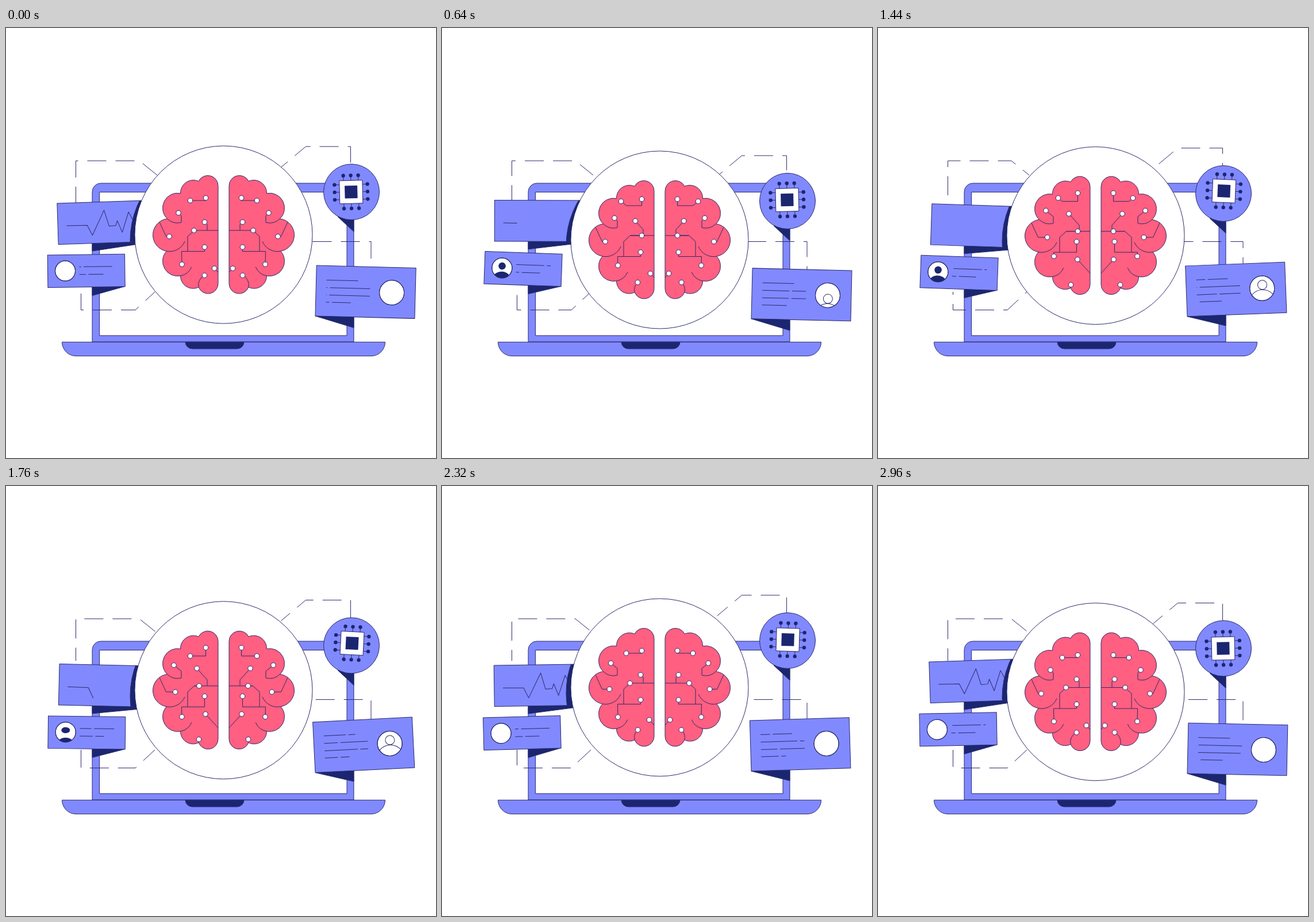
Write an HTML page that moves like this. It is 748 by 748 pixels and loops after 3.04 s.

```html
<!DOCTYPE html>
<html lang="en">
<head>
<meta charset="utf-8">
<title>Brain and laptop</title>
<style>
  html, body { margin: 0; width: 100%; height: 100%; overflow: hidden; background: #fff; }
  svg { display: block; width: 100vw; height: 100vh; }
  .blue { fill: #8189ff; }
  .navy { fill: #1b2670; }
  .white { fill: #fff; }
  .pink { fill: #ff5f80; }
  .line { fill: none; }
  .bare { stroke: none; }
  .march { fill: none; stroke-dasharray: 33 16; }
</style>
</head>
<body>
<svg viewBox="0 0 748 748" stroke="#2a2b6c" stroke-width="1" stroke-linejoin="round">
  <defs>
    <clipPath id="cardClip"><rect id="cardClipRect" x="26.3" y="-75" width="175" height="71.5"/></clipPath>
    <clipPath id="faceClip"><circle cx="-36.5" cy="-28.5" r="17.5"/></clipPath>
    <clipPath id="userClip"><circle cx="132" cy="-44" r="21.5"/></clipPath>
    <linearGradient id="shine" gradientUnits="userSpaceOnUse" x1="-8.5" y1="-8.5" x2="8.5" y2="8.5">
      <stop offset="0" stop-color="#1b2670"/><stop offset="0" stop-color="#fff"/>
      <stop offset="1" stop-color="#fff"/><stop offset="1" stop-color="#1b2670"/>
    </linearGradient>
  </defs>

  <g id="laptop">
    <path class="blue" fill-rule="evenodd" d="M150 546V285A15 15 0 0 1 165 270H590A15 15 0 0 1 605 285V546ZM162.5 285.5V535H593V285.5Z"/>
    <path class="blue" d="M97.5 546.3H659.5A24.3 24.3 0 0 1 635 570.6H122A24.3 24.3 0 0 1 97.5 546.3Z"/>
    <path class="navy" d="M312 546.3H414A12 12 0 0 1 402 558H324A12 12 0 0 1 312 546.3Z"/>
  </g>

  <path id="dashTopLeft" class="march" d="M121.5 304V231H232L263 256"/>
  <path id="dashBottomLeft" class="march" d="M130.5 459V490.5H225L259 459"/>
  <path id="dashRight" class="march" d="M635 421V371.5H533"/>
  <path id="dashChip" class="march" d="M0 -48V-79H-78L-121 -43"/>

  <path id="pulseShadow" class="navy"/>
  <g id="pulseCard">
    <rect class="blue" x="26.3" y="-75" width="175" height="71.5"/>
    <path id="pulse" class="line" pathLength="100" d="M41.5 -35.5L77.5 -35L86 -17.5L107.5 -60.5L115.5 -32.5L127 -33L130 -41.5L138 -21L150 -56L158 -40"/>
  </g>
  <g clip-path="url(#cardClip)"><circle id="brainShadow" class="navy" cx="370.5" r="154.5"/></g>

  <path id="faceShadow" class="navy"/>
  <g id="faceCard">
    <rect class="blue" x="-67" y="-56.5" width="134.3" height="56.5"/>
    <circle class="white" cx="-36.5" cy="-28.5" r="17.5"/>
    <g clip-path="url(#faceClip)" class="navy bare">
      <ellipse id="faceBust" cx="-36.5" rx="16" ry="13.5"/>
      <ellipse id="faceHead" cx="-36.5"/>
    </g>
    <circle class="line" cx="-36.5" cy="-28.5" r="17.5"/>
  </g>

  <path id="userShadow" class="navy"/>
  <g id="userCard">
    <rect class="blue" x="0" y="-88" width="173" height="88"/>
    <circle class="white" cx="132" cy="-44" r="21.5"/>
    <g clip-path="url(#userClip)"><g id="user" class="line">
      <circle cx="132.5" cy="-50" r="8"/>
      <circle cx="132" cy="-17.5" r="24"/>
    </g></g>
    <circle class="line" cx="132" cy="-44" r="21.5"/>
  </g>

  <g id="chip">
    <path class="navy" d="M-24 43L4 69V30Z"/>
    <circle class="blue" r="48.5"/>
    <g id="chipCore"></g>
  </g>

  <g id="brain">
    <circle class="white" r="154.5"/>
    <g id="leftHalf"></g>
    <g id="rightHalf" transform="scale(-1 1)"></g>
  </g>
</svg>
<script>
const LOOP = 3040, STEP = 80;
const el = id => document.getElementById(id);
const set = (node, attrs) => {
  for (const name in attrs) node.setAttribute(name, attrs[name]);
  return node;
};
const add = (parent, tag, attrs) =>
  parent.appendChild(set(document.createElementNS('http://www.w3.org/2000/svg', tag), attrs));

const wave = (t, start = 0) => Math.sin(2 * Math.PI * (t - start) / LOOP);
const clamp = x => Math.min(1, Math.max(0, x));
const ease = x => x < .5 ? 2 * x * x : 1 - 2 * (1 - x) ** 2;
const ramp = (t, a, b) => ease(clamp((t - a) / (b - a)));
const pulseBetween = (t, [a, b, c, d]) => ramp(t, a, b) - ramp(t, c, d);
const place = (id, x, y, deg = 0) =>
  set(el(id), { transform: `translate(${x} ${y}) rotate(${deg})` });
const slope = deg => Math.tan(deg * Math.PI / 180);

// Piecewise linear value through [time, value] points.
function through(t, points) {
  let [t0, v0] = points[0];
  for (const [t1, v1] of points) {
    if (t < t1) return t1 === t0 ? v1 : v0 + (v1 - v0) * (t - t0) / (t1 - t0);
    [t0, v0] = [t1, v1];
  }
  return v0;
}

// Text stroke with small gaps that travel along it once per loop.
const GAP = 4.5;
function textLine(card, x, y, length, travel, gaps) {
  const dashes = gaps.flatMap((gap, i) => [(gaps[i + 1] ?? gaps[0] + travel) - gap - GAP, GAP]);
  const node = add(el(card), 'path', {
    class: 'line', d: `M${x} ${y}h${length}`, 'stroke-dasharray': dashes.join(' ')
  });
  return u => set(node, { 'stroke-dashoffset': -(gaps[0] + GAP / 2 + travel * u) });
}
const textLines = [
  textLine('faceCard', -12, -35.3, 60, 216, [-156.5, -102.5, -48.5, 5.5]),
  textLine('faceCard', -12, -22, 42, 146, [-96, -59.5, -23, 13.5]),
  textLine('userCard', 18, -63, 55, 216, [-146, -84.5]),
  textLine('userCard', 18, -50, 76, 216, [-99, 4]),
  textLine('userCard', 18, -37, 76, 216, [-134, -65, 3.2]),
  textLine('userCard', 18, -24.5, 43, 216, [-132, -100, 8])
];

// Chip with three pins on each side.
const core = el('chipCore');
for (const side of [0, 90, 180, 270]) {
  const [c, s] = [Math.cos(side * Math.PI / 180), Math.sin(side * Math.PI / 180)];
  for (const k of [-13, 0, 13]) {
    const at = r => [r * c - k * s, r * s + k * c];
    const [a, b] = [at(20), at(27)];
    add(core, 'path', { d: `M${a}L${b}` });
    const [cx, cy] = at(28.7);
    add(core, 'circle', { cx, cy, r: 3.2, fill: 'url(#shine)', stroke: 'none' });
  }
}
add(core, 'rect', { x: -20, y: -20, width: 40, height: 40, class: 'white' });
add(core, 'rect', { x: -11, y: -11, width: 22, height: 22, fill: 'url(#shine)', stroke: 'none' });

// Half a brain: overlapping round lobes [x, y, radius], from top to bottom.
const lobes = [
  [-27.5, -85, 18], [-52.5, -72.5, 22.5], [-80, -46.5, 26], [-94.5, .5, 28.5],
  [-80, 46, 26], [-53, 71.5, 22], [-27, 85, 17.5]
];
// Outer crossing of two neighbouring lobes.
function joint([ax, ay, ar], [bx, by, br]) {
  const dx = bx - ax, dy = by - ay, d = Math.hypot(dx, dy);
  const along = (d * d + ar * ar - br * br) / (2 * d);
  const out = Math.sqrt(ar * ar - along * along);
  return [ax + (along * dx - out * dy) / d, ay + (along * dy + out * dx) / d];
}
const joints = lobes.slice(1).map((lobe, i) => joint(lobes[i], lobe));
const arcTo = (r, point) => `A${r} ${r} 0 0 0 ${point}`;
const halfOutline = 'M-9.5 -85' +
  lobes.map(([, , r], i) => arcTo(r, joints[i] ?? [-9.5, 85])).join('') + 'Z';
const folds = [[2, [-73.5, -21.3]], [3, [-67.5, 11.5]], [4, [-55.7, 56]]]
  .map(([i, end]) => `M${joints[i]}${arcTo(lobes[i][2], end)}`).join('');

// Circuit nodes: rest point, far point, times out and back, wire leading to the node.
const circuits = [
  { from: [-31, -64], to: [-31, -74], when: [400, 800, 1850, 2250], wire: 'M-58 -59.5H-31' },
  { from: [-58, -59.5], to: [-67, -67], when: [220, 520, 1340, 1640], wire: 'M-58 -59.5' },
  { from: [-78.5, -38], to: [-86.5, -43.5], when: [1000, 1400, 2200, 2560], wire: 'M-73.5 -21.5V-33' },
  { from: [-33, -22], to: [-46.5, -38], when: [400, 800, 1850, 2250], wire: 'M-28.5 -7.5V-18' },
  { from: [-51.5, -7.5], to: [-31, -7.5], when: [0, 320, 1600, 1900], wire: 'M-9.5 -7.5H-51L-62.5 3V29M-51 -7.5' },
  { from: [-33, 21.5], to: [-33, 10.5], when: [800, 1120, 1850, 2250], wire: 'M-73 29H-33' },
  { from: [-72.5, 51.5], to: [-72.5, 36], when: [450, 850, 1560, 1900], wire: 'M-73 29' },
  { from: [-94.5, 3], to: [-84, 3], when: [850, 1180, 2180, 2540], wire: 'M-111.5 -22L-100 3' },
  { from: [-16, 58.5], to: [-31.5, 41.5], when: [780, 1100, 2060, 2410], wire: 'M-9.5 65.5' },
  { arc: [-27, 85.5, 16], when: [500, 850, 2100, 2460] }
];
const halves = ['leftHalf', 'rightHalf'].map(id => {
  const g = el(id);
  add(g, 'path', { class: 'pink', d: halfOutline });
  add(g, 'path', { class: 'line', d: folds });
  const wires = circuits.map(() => add(g, 'path', { class: 'line' }));
  const nodes = circuits.map(() => add(g, 'circle', { class: 'white', r: 4.2 }));
  return { wires, nodes };
});

function drawCircuits(t) {
  circuits.forEach((circuit, i) => {
    const k = pulseBetween(t, circuit.when);
    let x, y, d;
    if (circuit.arc) {
      const [cx, cy, r] = circuit.arc, angle = (-112.5 - 67.5 * k) * Math.PI / 180;
      x = cx + r * Math.cos(angle);
      y = cy + r * Math.sin(angle);
      d = `M${joints[5]}A18 18 0 0 1 ${x} ${y}`;
    } else {
      [x, y] = circuit.from.map((a, j) => a + (circuit.to[j] - a) * k);
      d = `${circuit.wire}L${x} ${y}`;
    }
    for (const { wires, nodes } of halves) {
      set(wires[i], { d });
      set(nodes[i], { cx: x, cy: y });
    }
  });
}

function drawPulseCard(t, s) {
  const deg = 1.95 * wave(t, 600), y = 380.8 - 6.5 * s;
  const bottom = x => y - 3.5 + (x - 65) * slope(deg);
  place('pulseCard', 65, y, deg);
  place('cardClipRect', 65, y, deg);
  set(el('pulseShadow'), { d: `M150 ${bottom(150) - 9}V${bottom(150) + 13.5}L230 ${bottom(230) + 4}V${bottom(230) - 9}Z` });
  const shown = t < 1200 ? 1 - ramp(t, 100, 800) : ramp(t, 1500, 2240);
  set(el('pulse'), {
    'stroke-dasharray': `${100 * shown} 200`,
    visibility: shown > 0 ? 'visible' : 'hidden'
  });
}

function drawFaceCard(t) {
  const deg = .5 + 2.25 * wave(t, 280), y = 452.8 - 5.6 * wave(t, -194);
  const bottom = x => y + (x - 139.9) * slope(deg);
  place('faceCard', 139.9, y, deg);
  set(el('faceShadow'), { d: `M150 ${bottom(150) - 5}V${bottom(150) + 15}L206 ${bottom(206)}V${bottom(206) - 5}Z` });
  const bust = through(t, [[80, 19], [320, 2], [560, 6.3], [1680, 6.3], [1760, 9.5], [1920, 19]]);
  const head = through(t, [[80, 26], [320, -11], [560, -3.5], [1760, -3.5], [1920, 26]]);
  const squash = through(t, [[1660, 0], [1760, 1], [1920, 0]]);
  set(el('faceBust'), { cy: bust - 15 });
  set(el('faceHead'), { cy: head - 28.5, rx: 6.3 + 1.2 * squash, ry: 6.3 - squash });
}

function drawUserCard(t, s, deg) {
  const y = 501 + 5 * s, edge = y + 67 * slope(deg);
  place('userCard', 538, y, deg);
  set(el('userShadow'), { d: `M538 ${y}L605 ${edge + 18.7}V${edge - 5}Z` });
  place('user', 0, 45 * (1 - pulseBetween(t, [450, 750, 1900, 2200])));
}

function drawChip(t, s, deg) {
  const y = 285.2 + 16.3 * s;
  place('chip', 601, y);
  place('dashChip', 599.5, y);
  place('chipCore', -.1 + .4 * deg, -2.2 - 2.2 * wave(t, 680), deg);
  const sweep = (11 + (t - 320) * .4) / 2;
  set(el('shine'), { gradientTransform: `translate(${sweep} ${sweep})` });
}

function draw(t) {
  const u = t / LOOP, s = wave(t), tilt = -.5 + 2.4 * wave(t, -460);
  const brainY = 359.6 + 9.2 * s;
  place('brain', 378.5, brainY);
  set(el('brainShadow'), { cy: brainY + 10 });
  drawCircuits(t);
  drawPulseCard(t, s);
  drawFaceCard(t);
  drawUserCard(t, s, tilt);
  drawChip(t, s, -tilt);
  textLines.forEach(move => move(u));
  const starts = { dashTopLeft: -5, dashBottomLeft: 3, dashRight: 20, dashChip: 3 };
  for (const id in starts) set(el(id), { 'stroke-dashoffset': -(starts[id] + 245 * u) });
}

let begin;
function tick(now) {
  begin ??= now;
  draw(Math.floor((now - begin) % LOOP / STEP) * STEP);
  requestAnimationFrame(tick);
}
draw(0);
requestAnimationFrame(tick);
</script>
</body>
</html>
```
